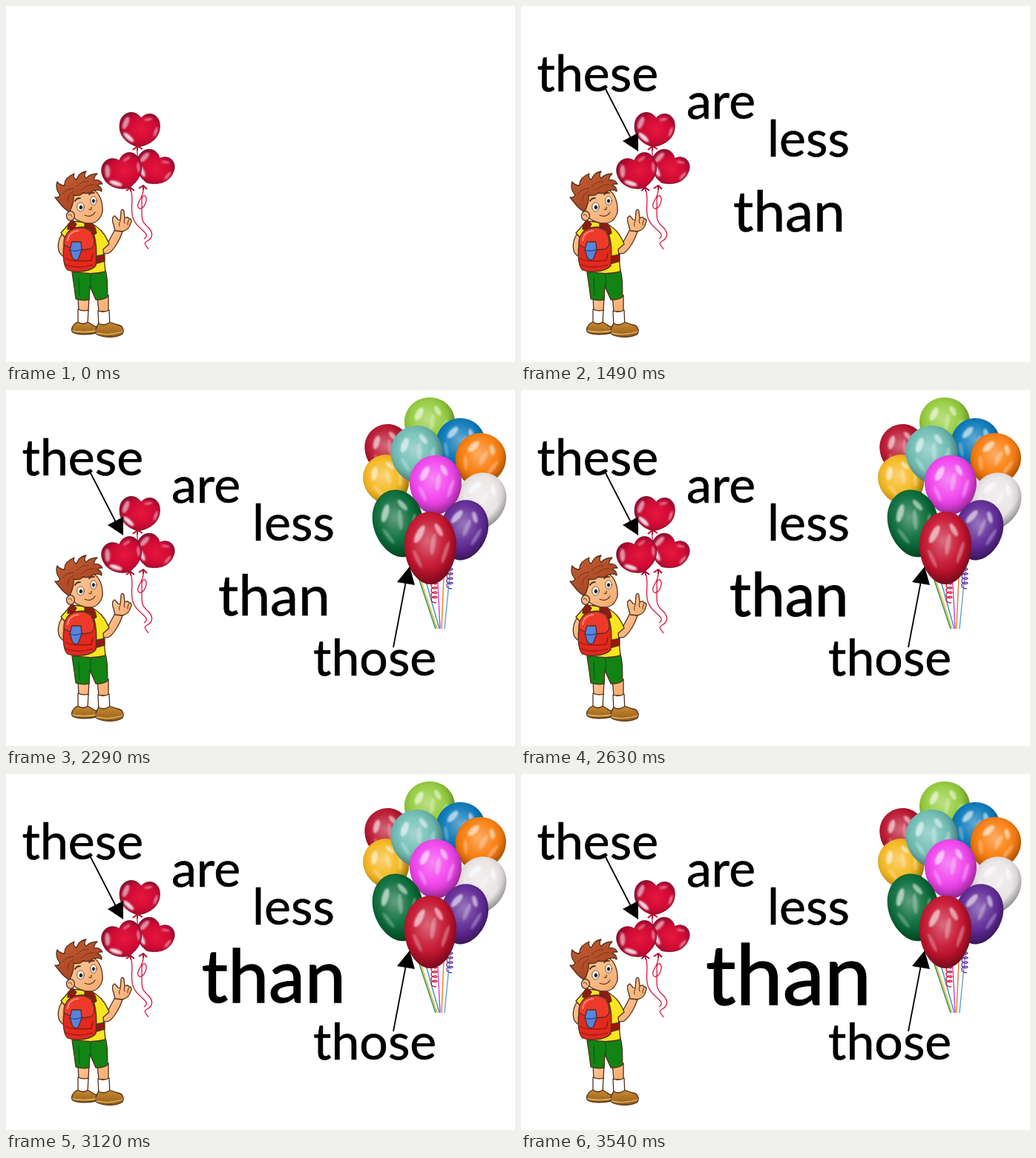
Animation of 686x480 px, one loop 3.61 s. Source, as an HTML page:

```html
<!DOCTYPE html>
<html lang="en">
<head>
<meta charset="utf-8">
<title>These are less than those</title>
<style>
  html, body { margin: 0; width: 100%; height: 100%; overflow: hidden; background: #fff; }
  svg { display: block; width: 686px; height: 480px; }
  text { font: 68px Lato, "Open Sans", sans-serif; stroke: #000; stroke-width: .6; }
  .grown { filter: blur(.35px); stroke-width: 1; }
  .boy { stroke: #54301c; stroke-width: 1.3; stroke-linejoin: round; stroke-linecap: round; }
  .line { fill: none; }
</style>
</head>
<body>
<svg viewBox="0 0 686 480">
  <defs>
    <radialGradient id="shade" cx=".45" cy=".4" r=".62">
      <stop offset="0" stop-color="#fff" stop-opacity=".36"/>
      <stop offset=".5" stop-color="#fff" stop-opacity=".06"/>
      <stop offset=".7" stop-color="#000" stop-opacity=".08"/>
      <stop offset="1" stop-color="#000" stop-opacity=".45"/>
    </radialGradient>
    <radialGradient id="heartFill" cx=".55" cy=".48" r=".6">
      <stop offset="0" stop-color="#e5173f"/>
      <stop offset=".6" stop-color="#cf0a34"/>
      <stop offset="1" stop-color="#8c0a2c"/>
    </radialGradient>
    <linearGradient id="skin" x2="1" y2="1">
      <stop offset="0" stop-color="#ffca98"/>
      <stop offset="1" stop-color="#f5a96f"/>
    </linearGradient>
    <linearGradient id="hair" x2=".6" y2="1">
      <stop offset="0" stop-color="#c4603a"/>
      <stop offset="1" stop-color="#a5431f"/>
    </linearGradient>
    <linearGradient id="shoe" y2="1" x2="0">
      <stop offset="0" stop-color="#c88a30"/>
      <stop offset="1" stop-color="#93601a"/>
    </linearGradient>
    <filter id="soft" x="-50%" y="-50%" width="200%" height="200%"><feGaussianBlur stdDeviation="1.3"/></filter>
    <path id="egg" d="M0-1C.58-1 1-.58 1-.08C1 .46 .55 1 0 1C-.55 1-1 .46-1-.08C-1-.58-.58-1 0-1Z"/>
    <g id="heart">
      <path d="M0 24C-17 21-29 9-27-7C-25-22-8-27 1-15C9-26 26-23 27-6C28 10 16 20 0 24Z" fill="url(#heartFill)" stroke="#6d1028" stroke-width=".8"/>
      <g fill="#fff" filter="url(#soft)">
        <ellipse cx="-19" cy="-7" rx="3.500" ry="9" transform="rotate(18 -19 -7)" opacity=".55"/>
        <ellipse cx="-14" cy="12" rx="9" ry="3" transform="rotate(38 -14 12)" opacity=".85"/>
        <ellipse cx="11" cy="-14" rx="6" ry="1.800" transform="rotate(-15 11 -14)" opacity=".4"/>
        <ellipse cx="22" cy="2" rx="1.800" ry="7" transform="rotate(15 22 2)" opacity=".5"/>
      </g>
    </g>
  </defs>

  <g id="hearts">
    <g fill="none" stroke="#d81440" stroke-width="1.3">
      <path d="M177 190C176 197 178 206 178 216"/>
      <path d="M168 247C173 262 166 276 172 288C177 299 186 302 189 308Q190 312 186 314"/>
      <path d="M185 244C187 258 175 264 178 271C181 277 188 270 189 262C190 254 183 253 183 262C184 278 180 288 189 296C200 305 198 313 190 317C184 320 189 323 192 328"/>
    </g>
    <use href="#heart" transform="translate(180 166) rotate(4)"/>
    <use href="#heart" transform="translate(200 218) rotate(26) scale(.95)"/>
    <use href="#heart" transform="translate(157 223) rotate(-20)"/>
    <path d="M171 194l6-5 7 4M177 189v6M162 249l6-4 5 4M168 245v5M179 246l6-4 5 5M185 242v6" fill="none" stroke="#b80c30" stroke-width="2"/>
  </g>

  <g class="boy">
    <path d="M77 306C70 313 69 326 72 332Q75 338 82 339L84 312Z" fill="url(#skin)"/>
    <path d="M97 392L98 411H111L112 392ZM123 391L125 412H138L138 390Z" fill="url(#skin)"/>
    <path d="M97 409Q104 412 111 410L110 430H97ZM124 411Q132 414 139 410L140 432H125Z" fill="#fff"/>
    <path d="M97 426C89 429 87 437 90 440C97 444 113 443 122 441L124 433C117 432 113 427 110 426Q104 431 97 426Z" fill="url(#shoe)"/>
    <path d="M125 428C121 433 119 440 123 443C133 448 151 447 157 442C160 437 157 431 151 430C146 429 142 426 139 427Q132 432 125 428Z" fill="url(#shoe)"/>
    <path d="M90 438Q106 441 121 438M122 441Q140 445 157 439" class="line" stroke="#e0b565"/>
    <path d="M89 359C91 373 93 385 94 395Q103 398 112 396L113 378L121 396Q130 397 137 392C136 380 138 370 134 356Z" fill="#118414"/>
    <path d="M114 363L114 380M98 366L99 390" class="line" stroke="#0b5d16"/>
    <path d="M129 319C132 321 135 320 138 318L147 301L157 304C154 314 147 327 139 333Q134 335 126 332Z" fill="url(#skin)"/>
    <path d="M147 303L145 295C143 290 143 285 146 283C148 283 149 286 151 288L154 289L155 277C156 273 159 274 159 278L160 286C163 284 165 285 166 287C169 286 170 290 168 293C167 299 162 303 157 304Z" fill="url(#skin)"/>
    <path d="M160 286Q158 290 160 293M166 288Q163 292 164 295M154 290Q151 294 153 297" class="line" stroke-width="1"/>
    <path d="M88 290L74 306L81 314L90 357Q112 364 134 358L131 328L139 321C134 308 127 299 113 292Z" fill="#f8e520"/>
    <path d="M119 338L133 335V344L119 348Z" fill="#97180f"/>
    <path d="M83 301Q83 293 89 289L95 294L91 301ZM106 293L112 290Q120 294 122 306L118 309Q116 299 106 297Z" fill="#97180f"/>
    <path d="M82 307C88 297 108 295 116 303C122 313 123 333 121 350C116 357 96 361 83 356C76 350 75 325 82 307Z" fill="#e12a20"/>
    <path d="M78 322C77 309 86 299 98 299C110 298 119 304 119 320Q118 327 111 328Q94 331 78 322Z" fill="#ef3a2b"/>
    <path d="M80 340Q88 346 115 343L117 334M81 349Q98 355 117 349" class="line" stroke="#9c160e"/>
    <path d="M83 316Q85 304 97 303" class="line" stroke="#ff8a70" stroke-width="2"/>
    <path d="M89 318L101 318L102 329L97 342Q91 344 89 338L86 328Z" fill="#5685dc"/>
    <path d="M87 329Q94 332 102 328" class="line" stroke="#223c85"/>

    <path d="M86 262C90 252 105 248 118 248C126 252 131 265 130 277C128 288 120 293 113 293C103 293 92 289 87 280Z" fill="url(#skin)"/>
    <ellipse cx="87" cy="283" rx="5.5" ry="6.3" fill="url(#skin)"/>
    <path d="M84 282Q87 279 89 284" class="line" stroke-width="1"/>
    <path d="M84 277C76 272 72 265 66 258C70 259 72 257 73 255C68 249 67 243 69 237C72 241 76 242 79 242C78 235 84 229 92 226C90 231 93 234 95 234C97 228 102 224 108 223C105 227 106 231 108 232C112 228 117 226 123 226C119 230 118 233 119 235C124 234 128 236 130 240C126 239 124 241 123 242C127 243 129 246 129 250C125 247 121 248 118 249C113 253 108 253 104 252C100 256 95 256 91 255C92 262 90 268 87 275Z" fill="url(#hair)"/>
    <path d="M76 254Q82 246 91 246M83 263Q82 254 91 250M95 244Q102 235 111 237M101 248Q112 239 119 241" class="line" stroke="#7d3014" stroke-width="1"/>
    <g stroke-width=".8">
      <ellipse cx="100.500" cy="271" rx="4.800" ry="6" fill="#fff"/>
      <ellipse cx="118" cy="262.500" rx="4.300" ry="5.700" fill="#fff"/>
      <g fill="#17120f" stroke="#8a8d90">
        <ellipse cx="101" cy="271.500" rx="2.200" ry="2.800"/>
        <ellipse cx="118" cy="263" rx="2.100" ry="2.700"/>
      </g>
    </g>
    <path d="M93 263Q95 259 100 259M112 254Q115 251 119 252" class="line" stroke-width="1.8"/>
    <path d="M112 274Q116 276 115 271M106 282Q115 286 120 278" class="line" stroke-width="1.2"/>
  </g>

  <text data-at="340" x="21.500" y="115">these</text>
  <g data-at="540">
    <path d="M114 112L150 182" stroke="#000" stroke-width="1.8"/>
    <path d="M158 196L137 182L158 171Z"/>
  </g>
  <text data-at="880" x="223" y="152">are</text>
  <text data-at="1150" x="332" y="203">less</text>
  <text id="than" data-at="1490" x="286" y="304" style="font-size:76.500px">than</text>
  <g id="bunch" data-at="2290"></g>
  <text data-at="1960" x="414" y="385">those</text>
  <g data-at="2090">
    <path d="M522 347L539 258" stroke="#000" stroke-width="1.8"/>
    <path d="M544 238L527 259L551 263Z"/>
  </g>
</svg>

<script>
const LOOP = 3610, GROW_AT = 2560, STEP = 70, STEPS = 15, GROWTH = .032;

// x, y, half width, half height, tilt, colour
const balloons = [
  [571, 46, 34, 36, 0, '#94cc3c'],
  [515, 81, 31, 35, -12, '#b9142f'],
  [612, 74, 33, 36, 15, '#0878b8'],
  [639, 94, 34, 36, 20, '#fb7d0c'],
  [513, 121, 31, 34, -18, '#f5b81f'],
  [554, 87, 35, 39, -8, '#6fbdb5'],
  [640, 150, 33, 39, 20, '#ebe6e6'],
  [579, 128, 35, 40, 0, '#f243ee'],
  [617, 189, 32, 41, 14, '#5f2896'],
  [529, 180, 34, 46, -13, '#086b38'],
  [572, 213, 35, 49, 0, '#c5132f']
];

// start x and y, end x, colour
const strings = [
  [551, 238, 579, '#2f8f55'], [557, 250, 581, '#e8b93a'], [566, 258, 584, '#3f9bc8'],
  [582, 260, 585, '#d24ad2'], [590, 252, 587, '#f08030'], [599, 240, 591, '#6aa8d4']
];

const line = ([x, y, end, color]) =>
  `<path d="M${x} ${y}L${end} 322" stroke="${color}" stroke-width="1.5"/>`;

function curl(x, y, color) {
  let d = '';
  for (let a = 0; a < 26; a += .4)
    d += `${a ? 'L' : 'M'}${(x + 4 * Math.sin(a)).toFixed(1)} ${(y + a + 2.5 * Math.cos(a)).toFixed(1)}`;
  return `<path d="${d}" fill="none" stroke="${color}" stroke-width="1.4"/>`;
}

function glow(x, y, rx, ry, tilt, opacity) {
  return `<ellipse rx="${rx}" ry="${ry}" transform="translate(${x} ${y}) rotate(${tilt})" opacity="${opacity}"/>`;
}

function balloon([x, y, w, h, tilt, color]) {
  const egg = fill => `<use href="#egg" transform="scale(${w} ${h})" fill="${fill}"/>`;
  return `<g transform="translate(${x} ${y}) rotate(${tilt})">${egg(color)}${egg('url(#shade)')}
    <g fill="#fff" filter="url(#soft)">
      ${glow(-w * .42, -h * .38, w * .13, h * .27, 28, .6)}
      ${glow(w * .32, -h * .5, w * .1, h * .2, -30, .55)}
      ${glow(w * .1, -h * .1, w * .1, h * .3, 8, .3)}
      ${glow(w * .58, h * .12, w * .08, h * .32, 18, .3)}
      ${glow(-w * .5, h * .3, w * .08, h * .28, -25, .28)}
    </g></g>`;
}

document.getElementById('bunch').innerHTML =
  strings.map(line).join('') + curl(577, 259, '#d01c3c') + curl(598, 240, '#7038a0') +
  balloons.map(balloon).join('');

const parts = [...document.querySelectorAll('[data-at]')];
const than = document.getElementById('than');

function draw(now) {
  const t = now % LOOP;
  for (const part of parts) part.style.display = t >= +part.dataset.at ? '' : 'none';
  const n = Math.max(0, Math.min(STEPS, Math.floor((t - GROW_AT) / STEP) + 1));
  const s = 1 + n * GROWTH;
  than.setAttribute('transform', `translate(363 290) scale(${s}) translate(-363 -290)`);
  than.classList.toggle('grown', n > 0);
}

const start = performance.now();
function tick() {
  draw(performance.now() - start);
  requestAnimationFrame(tick);
}
tick();
</script>
</body>
</html>
```
